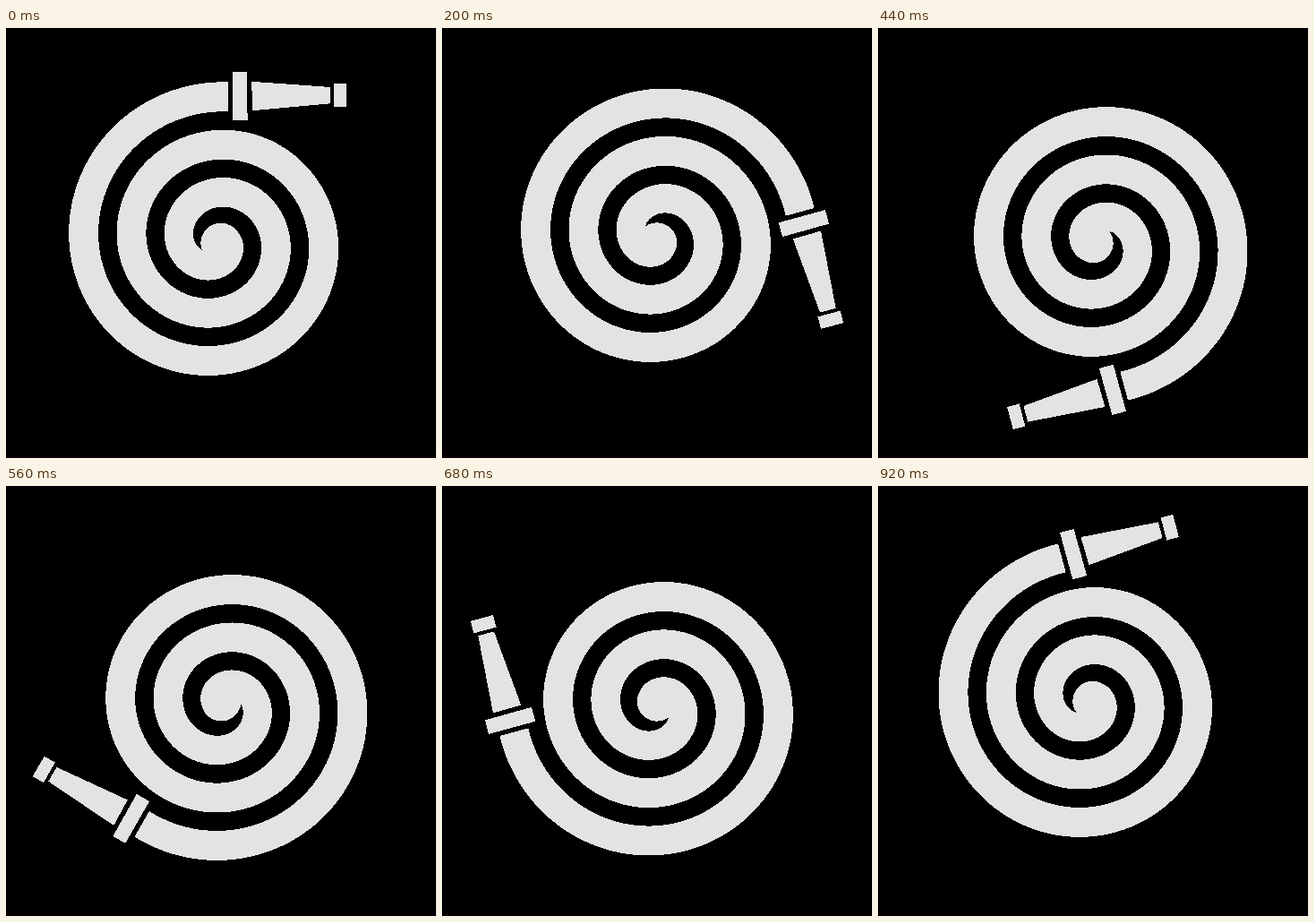
Write an HTML page that moves like this. It is 480 by 480 pixels and loops after 0.96 s.

```html
<!DOCTYPE html>
<html lang="en">
<head>
<meta charset="utf-8">
<title>Rotating hose</title>
<style>
  html, body { margin: 0; width: 100%; height: 100%; overflow: hidden; background: #000; }
  svg { display: block; width: 100%; height: 100%; }
</style>
</head>
<body>
<svg viewBox="0 0 480 480" shape-rendering="crispEdges">
  <rect y="477" width="480" height="3" fill="#080003"/>
  <g id="hose" fill="#e3e3e3">
    <path id="coil"/>
    <path d="M253 49h16L269.6 103H253.2z"/>
    <path d="M274.3 59.8L362 66V84.3L275 92.2z"/>
    <path d="M366 62h14v26h-14z"/>
  </g>
</svg>
<script>
  const CENTER = { x: 234, y: 237.5 };
  const PITCH = 53.5, OUTER = 177, INNER = 144;
  const STEP_MS = 40, STEPS = 24;

  // Archimedean spiral; degrees run counterclockwise inward from the top.
  function spiral(radius, from, to) {
    const points = [];
    const count = Math.ceil(Math.abs(to - from) / 3);
    for (let i = 0; i <= count; i++) {
      const deg = from + (to - from) * i / count;
      const r = radius - PITCH * deg / 360;
      const a = deg * Math.PI / 180;
      points.push((CENTER.x - r * Math.sin(a)).toFixed(2) + ' ' + (CENTER.y - r * Math.cos(a)).toFixed(2));
    }
    return points;
  }

  const outer = spiral(OUTER, -4.45, 1020);
  const inner = spiral(INNER, 845, -5.5);
  document.getElementById('coil').setAttribute('d',
    `M${outer.join('L')}A22.3 22.3 0 0 0 ${inner.join('L')}Z`);

  const hose = document.getElementById('hose');
  function draw() {
    const step = Math.floor(performance.now() / STEP_MS) % STEPS;
    hose.setAttribute('transform', `rotate(${step * 360 / STEPS} 240 240)`);
    requestAnimationFrame(draw);
  }
  draw();
</script>
</body>
</html>
```
